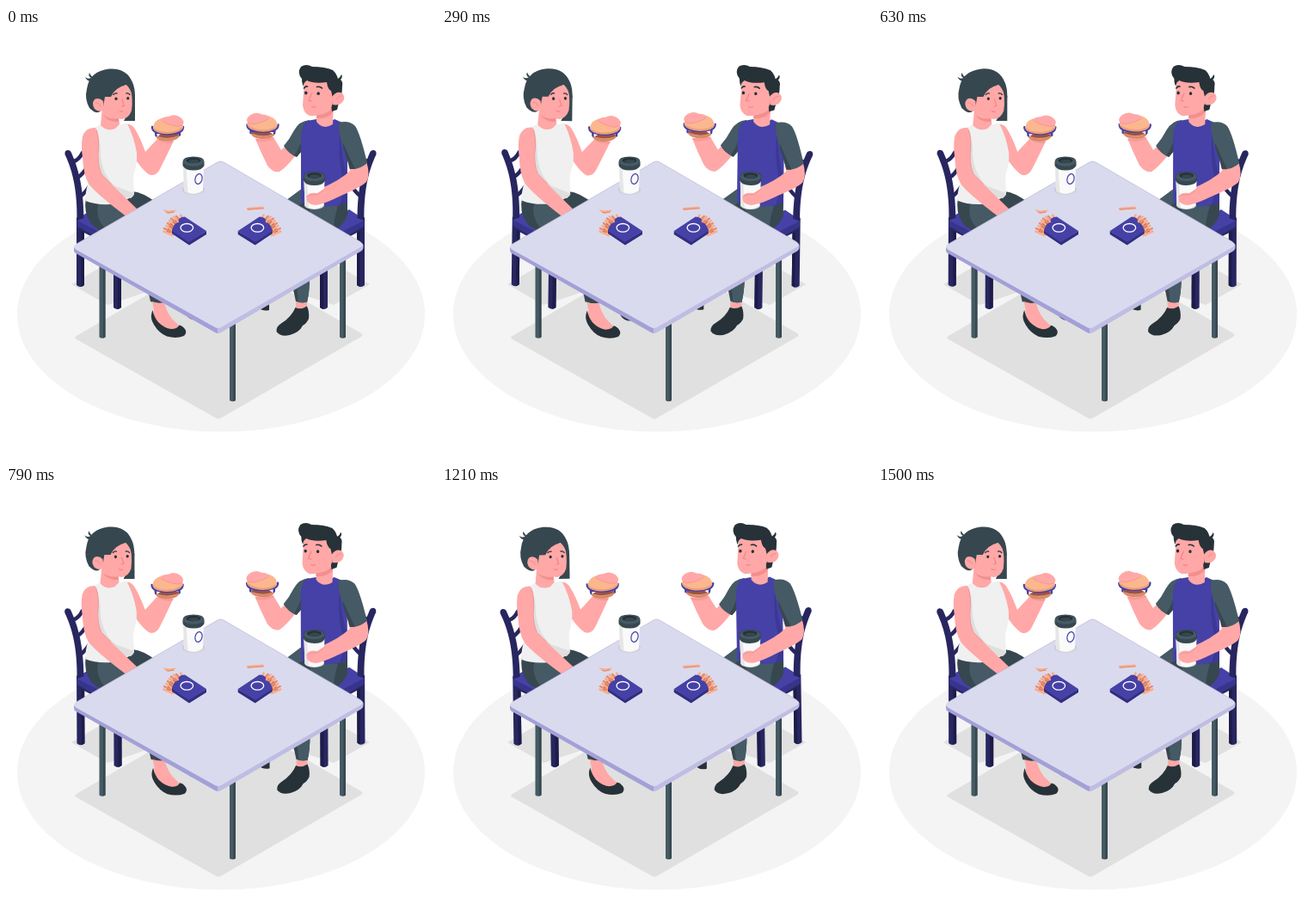
Animation of 500x500 px, one loop 1.54 s. Source, as an HTML page:

```html
<!DOCTYPE html>
<html lang="en">
<head>
<meta charset="utf-8">
<title>Lunch together</title>
<style>
html, body { margin: 0; width: 100%; height: 100%; overflow: hidden; background: #fff; }
svg { display: block; width: 100vw; height: 100vh; }
.skin { fill: #ffa8a7; }
.skin2 { fill: #f28f8f; }
.dark { fill: #263238; }
.slate { fill: #37474f; }
.grey { fill: #455a64; }
.navy { fill: #28265f; }
.blue { fill: #4541a6; }
.line { fill: none; stroke-linecap: round; stroke-linejoin: round; }
</style>
</head>
<body>
<svg viewBox="0 0 500 500">
<defs>
  <g id="chair">
    <path class="line" stroke="#28265f" stroke-width="4.500" d="M79 155Q85 153 89 145M83 174Q89 171 95 160M86 196Q91 193 97 184"/>
    <path class="navy" d="M125 270H134V325Q129.500 329 125 325Z"/>
    <path fill="#1d1c4a" d="M130 270H134V325L130 327Z"/>
    <path class="navy" d="M82 220L118 238V252L91 238V299Q86.500 303 82 299Z"/>
    <path fill="#1d1c4a" d="M87.500 236L91 238V299L87.500 301Z"/>
    <path class="blue" d="M83 222L100 211L135 230L108 245L83 229Z"/>
    <path fill="#37348c" d="M83 224L108 237V245L83 231Z"/>
    <path class="navy" d="M68.500 147Q68 142.500 71.500 142Q75 142 76 145C84 163 90 184 90.500 221L82.500 224C83 190 78 167 68.500 147Z"/>
  </g>
  <g id="burger">
    <path fill="#d78a64" d="M173 122Q173 131.500 188 131.500Q202 131 203 122Z"/>
    <path fill="#f3b18b" d="M173 121Q174 127.500 188 128.500Q201 128 203 121Z"/>
    <path fill="#9c5248" d="M175 121Q188 126 202 121L200 125.500Q188 130 177 126Z"/>
    <path fill="#fff" d="M173 120L181 123L176 126L173 124ZM196 123L204 120V125L200 123Z"/>
    <path class="line" stroke="#4541a6" stroke-width="2.400" d="M170 115Q170 119 174 121L174.500 125M174 121Q188 125.500 202 121L202 124.500M202 121Q206 119 206 115"/>
    <path fill="#fbb78e" d="M171 116C171 108 179 104 188 104C199 104 206 109 206 115C206 123 172 126 171 116Z"/>
    <path fill="#ee9c74" d="M171 115C176 123 199 123 206 114C206 125 172 127 171 115Z"/>
    <path class="skin" d="M180 107Q182 103 189 103Q196 99 203 104Q209 109 205 113Q200 116 195 113.500Q185 112 180 107Z"/>
    <path class="line" stroke="#f28f8f" stroke-width=".7" d="M181 108Q187 112 195 113.500Q200 115.500 205 113"/>
  </g>
  <g id="cup">
    <ellipse cx="218" cy="188.500" rx="11.500" ry="5" fill="#dcdcdc"/>
    <path fill="#fafafa" d="M206 160H230L229 188.500Q218 197 207 188.500Z"/>
    <path fill="#e6e6e6" d="M206 160L207 188.500Q209 190.500 211.500 191.500L209.500 162Z"/>
    <path class="slate" d="M205.500 155.500Q205.500 149.500 218 149.500Q230.500 149.500 230.500 155.500V160Q228 165.500 218 165.500Q208 165.500 205.500 160Z"/>
    <ellipse class="grey" cx="218" cy="155.500" rx="11.800" ry="5.300"/>
    <ellipse class="dark" cx="218" cy="154" rx="8.500" ry="3.300"/>
    <ellipse class="slate" cx="218.500" cy="155" rx="6" ry="2"/>
  </g>
  <g id="fries">
    <path fill="#b5654f" d="M186 238L191 227L199 222L206 221L205 232L194 238Z"/>
    <g class="line" stroke-width="2.500">
      <path stroke="#e98d6e" d="M184 233L196 239M188 227L198 235M192 221.500L201 229M198 219L205 226"/>
      <path stroke="#fbab87" d="M183.500 236.500L194 241M186.500 230L197 238M190 224L200 233M195 219.500L203 228M203 217.500L207 224"/>
    </g>
    <path fill="#312e80" d="M193 234L213 248L233 236V240L213 252.500L193 239Z"/>
    <path class="blue" d="M193 236Q195 226 201 226Q199 220 208 219.500L233 236L212.500 249Z"/>
    <ellipse cx="210.300" cy="232.300" rx="7.300" ry="4.800" fill="none" stroke="#fff" stroke-width="1.300"/>
  </g>
</defs>

<ellipse cx="250" cy="333" rx="237" ry="136.500" fill="#f4f4f4"/>
<g fill="#e0e0e0">
  <path d="M76 298L150 255L215 290L118 322Z"/>
  <path d="M423 298L349 255L284 290L381 322Z"/>
  <path d="M82 358L247 262Q250 260 253 262L413 355Q416 357 413 359L250 453.500Q247 455.500 244 453.500L82 362Q78 360 82 358Z"/>
</g>

<g id="woman">
  <use href="#chair"/>
  <path class="dark" d="M209 333Q214 340 221 339.500L222 332Z"/>
  <path class="slate" d="M164 300H187L184 320Q176 321 168 318Z"/>
  <path class="skin" d="M170 318Q177 321 184 319Q187 331 193 338L202 347L190 353L176 345Q170 335 172 328Z"/>
  <path class="dark" d="M170.500 328Q167.500 335 170 341L172 345Q178 355 187 358.500Q198 361.500 207 358Q211 354 208 350Q205 346 201.500 345.500Q199 350 192 350Q184 349 177 342Q172 336 170.500 328Z"/>

  <path class="slate" d="M93 197Q90 215 98 226Q103 234 114 236L180 215L176 204Q160 191 147 190L138 199Z"/>
  <path class="grey" d="M108 203Q104 213 109 224Q112 231 118 235L150 220L128 203Z"/>
  <path class="skin" d="M136 112Q144 110 149 116Q156 127 162 144L176 129L195 131Q190 142 179 164Q175 172 168 171Q160 168 146 146Z"/>
  <path class="skin2" d="M178 129Q187 133 195 131L194 133.500Q187 135 178 131Z" opacity=".6"/>
  <path fill="#f0f0f0" d="M103 116L112 111Q121 121 133 112L141 111Q149 127 152 145Q153 158 148 172L149 193Q138 204 122 205Q104 206 92.500 201Q92 192 95 182L107 162Z"/>
  <path fill="#dfdfdf" d="M106 118Q110 130 110 148Q112 171 127 184L149 192Q150 194 145 198L135 197L108 168Z"/>
  <path class="skin" d="M104 116Q93 115 89 126Q87 137 89 150Q90 171 96 181Q105 193 141 220L153 211Q132 191 111 170Q107 160 107 148Q110 127 104 116Z"/>
  <path class="line" stroke="#f28f8f" stroke-width=".8" d="M105 118Q109 130 107 148Q107 161 111 170L122 181"/>

  <path class="skin" d="M112 92L110 113Q117 121 127 117L132 112L131 102Z"/>
  <path class="skin2" d="M113 101Q121 107 131 105L131 109Q119 110 113 101Z"/>
  <path class="slate" d="M99 62Q94 62 92 57Q95 60 99 58Q95 56 97 52Q99 57 103 58L106 62ZM140 66Q150 70 150 80V108H137Q142 100 142 90Z"/>
  <path class="skin" d="M111 70L144 66Q148 81 146 96Q143 105 135 106Q120 104 112 95Z"/>
  <path class="slate" d="M97 93Q91 82 94 71Q97 50 120 47.500Q140 46 147 63Q150 69 150 81L147 79Q145 71 140 66Q127 69 122 80H115L113 92Q108 104 97 93Z"/>
  <path class="skin" d="M113 85Q108 80 103 83Q99 88 103 94Q108 99 114 95Z"/>
  <path class="line" stroke="#f28f8f" stroke-width="1" d="M104 87Q108 86 110 91"/>
  <ellipse class="dark" cx="128" cy="82.300" rx="1.600" ry="1.800"/>
  <ellipse class="dark" cx="141.800" cy="81.800" rx="1.600" ry="1.800"/>
  <path class="line" stroke="#263238" stroke-width="1.300" d="M125 77.500Q126.500 75.500 129 76M140 76Q142.500 75.500 144 77.500"/>
  <path class="line" stroke="#f27f80" stroke-width="1" d="M135 83L137.500 90.500L134.500 91M132 96.500Q134 98 136 97"/>
  <use href="#burger"/>
</g>

<g id="man">
  <use href="#chair" transform="matrix(-1 0 0 1 499 0)"/>
  <path class="dark" d="M293 325Q299 330 306 328V316L296 321Z"/>
  <path class="slate" d="M331 290H353Q353 307 350 319Q343 321 337 318Z"/>
  <path class="grey" d="M337 290H353Q353 307 350 319L340 319.500Z"/>
  <path class="skin" d="M337 318Q344 321 350 319V331H337Z"/>
  <path class="dark" d="M336.500 325Q343 328 350 323.500Q353 330 352 338Q350 343 345 346Q341 354 330 357Q319 359.500 314.500 353Q314 347 320 343.500Q332 336 336.500 325Z"/>

  <path class="slate" d="M344 187L325 201L350 220L382 235Q393 229 397 218V202Z"/>
  <path class="grey" d="M344 187L325 201L338 208L346 202ZM352 209Q370 204 386 207Q381 222 381 235L360 227Z"/>
  <path class="skin" d="M325 137L320 142L311 127L290 129Q296 144 304 160Q311 169 318 167Q325 163 337 148Z"/>
  <path class="skin2" d="M290 128Q298 132 311 127L312 129Q299 134 291 131Z" opacity=".6"/>
  <path class="grey" d="M353 107Q341 108 335 119Q330 129 323 137Q328 146 338 150L347 139Z"/>
  <path class="slate" d="M344 130L345 142L338 150L335 148.500Q341 140 344 130Z"/>
  <path class="blue" d="M350 108L361 106Q370 114 382 106L391 110Q398 130 397 160V203Q373 212 343 203V125Q344 112 350 108Z"/>
  <path fill="#3b3896" d="M389 118Q389 146 395 166L397 172V203L388 206Q394 190 391 172Q385 146 389 118Z"/>
  <path class="skin" d="M398 160L419 155Q424 171 419 179Q411 187 372 202Q363 205 354 203L350 195L365 187Q389 177 400 166Z"/>
  <path class="grey" d="M387 110Q399 107 406 114Q412 123 420 157Q411 165 400 164Q396 148 392 138Q386 122 387 110Z"/>
  <path class="slate" d="M392 134Q398 148 406 164L400 164Q395 147 392 139Z"/>
  <use href="#cup" x="140.500" y="17.500"/>
  <path class="skin" d="M350 195Q353 190.500 362 192L373 185L382 180L389 195Q374 203 363 205.500Q356 207 351.500 203Q348.500 200 350 195Z"/>
  <path class="line" stroke="#f28f8f" stroke-width=".8" d="M350 196Q354 193 362 194L371 187"/>

  <path class="skin" d="M361 94L361 109Q369 119 380 112L381 88Z"/>
  <path class="skin2" d="M361 101Q373 101 380 93V98Q374 106 361 105Z"/>
  <path class="dark" d="M374 59Q381 55 386 59Q389 57 390 54Q392 57 389 60Q392 63 391 67Q391 79 387 87L385 95L379 97Z"/>
  <path class="skin" d="M347 60L376 58Q381 69 380 82Q381 94 371 98Q361 103 353 102Q346 99 345 90Z"/>
  <path class="dark" d="M346 68Q344 65 344 59Q338 52 343 45Q349 41 356 45Q371 45 380 49Q386 54 387 65Q389 74 385 81L380 82Q379 77 378 73Q374 71 373 63Q358 65 350 61Q346 63 346 68Z"/>
  <path class="skin" d="M379 80Q385 72 391 76Q395 80 392 85Q388 91 380 89Z"/>
  <path class="line" stroke="#f28f8f" stroke-width="1" d="M384 83Q386 79 390 79"/>
  <ellipse class="dark" cx="348.800" cy="75.500" rx="1.700" ry="1.900"/>
  <ellipse class="dark" cx="363.200" cy="76.200" rx="1.700" ry="1.900"/>
  <path class="line" stroke="#263238" stroke-width="1.600" d="M346.500 70Q348 67.500 350.500 68M361.500 68.500Q365 67.500 367.500 70"/>
  <path class="line" stroke="#f27f80" stroke-width="1" d="M355.500 76L352 84.500L355.500 85M355.500 91.500Q357.500 93 360 91.500"/>
  <use href="#burger" transform="matrix(-1 0 0 1 486.500 -2.500)"/>
</g>

<g>
  <g class="grey">
    <path d="M108.500 262H115.500V359.500Q112 362 108.500 359.500Z"/>
    <path d="M388 262H395V359.500Q391.500 362 388 359.500Z"/>
    <path d="M260 340H267V433Q263.500 435.500 260 433Z"/>
  </g>
  <path class="slate" d="M113 262H115.500V359.500L113 360.500ZM392.500 262H395V359.500L392.500 360.500ZM264.500 340H267V433L264.500 434Z"/>
  <path fill="#a3a0d8" d="M79 255V258Q79 261 82 262.500L243 354Q245 355 246.500 355V345L90 250Z"/>
  <path fill="#bfbde3" d="M415.500 252V255Q415.500 258 412 260L250 354Q248 355 246 355V345L405 247Z"/>
  <path fill="#dadaee" d="M82 251L246 156Q249.500 154 253 156L412 248.500Q418 252 412 255L250 348Q246.500 350 243 348L82 258Q76 254.500 82 251Z"/>
  <path class="line" stroke="#b9b7d6" stroke-width=".7" d="M82 251L246 156Q249.500 154 253 156L412 248.500"/>
  <ellipse cx="218" cy="188" rx="13" ry="6" fill="#c9c8dc"/>
  <use href="#cup"/>
  <ellipse cx="224" cy="175.500" rx="4" ry="6" transform="rotate(14 224 175.500)" fill="none" stroke="#4541a6" stroke-width="1.200"/>
  <use href="#fries"/>
  <use href="#fries" transform="matrix(-1 0 0 1 502.700 0)"/>
  <path fill="#fbab87" d="M182 211L189 212.500L198 211.500L195 214.500L188 215.500ZM280 209L299 207.500L300 210L281 211.500Z"/>
  <path fill="#e98d6e" d="M184 213L188 214.500L196 213.500L195 214.700L188 215.700ZM280 210.500L300 209.300V210.300L281 211.700Z"/>
</g>
</svg>
<script>
const LOOP = 1540, STEPS = 37, LEAD = 1;
const woman = document.getElementById('woman');
const man = document.getElementById('man');

// Triangle wave: 0, 1, 0, -1 degrees over one turn
function sway(step) {
  const p = ((step + LEAD) / STEPS + 0.25) % 1;
  return 1 - Math.abs(4 * p - 2);
}

function turn(el, angle, x, y) {
  el.setAttribute('transform', `rotate(${angle} ${x} ${y})`);
}

function draw(ms) {
  const step = Math.floor(((ms + 5) % LOOP) / LOOP * STEPS);
  const angle = sway(step) - sway(0);
  turn(woman, angle, 139, 204);
  turn(man, angle, 356, 200);
}

const start = performance.now();
function tick() {
  draw(performance.now() - start);
  requestAnimationFrame(tick);
}
draw(0);
tick();
</script>
</body>
</html>
```
